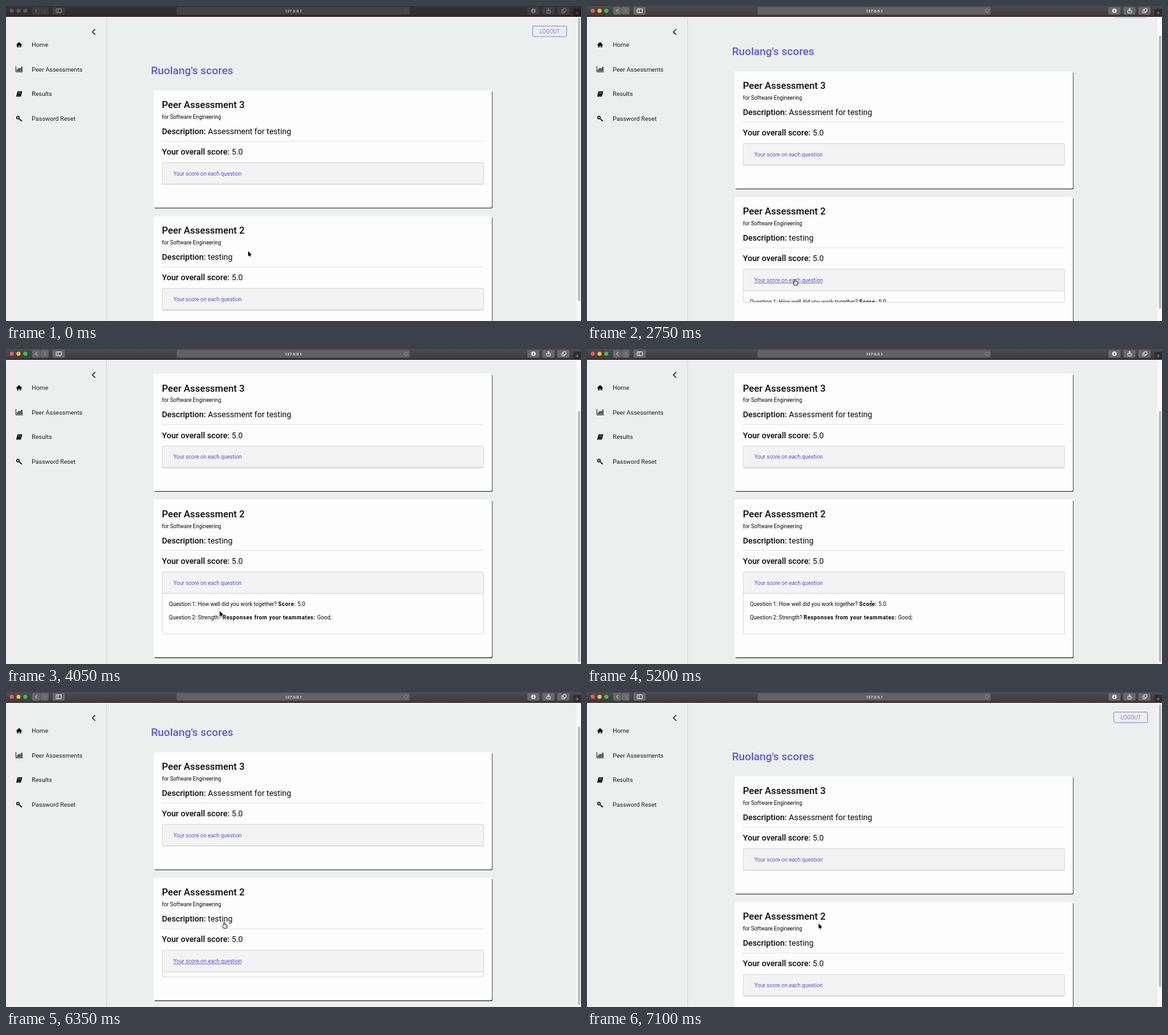
These frames come from a looping animation (900 by 494 pixels, 7150 ms). An HTML page with a canvas:

```html
<!DOCTYPE html>
<html lang="en">
<head>
<meta charset="utf-8">
<title>Scores</title>
<style>
html, body { margin: 0; width: 100%; height: 100%; overflow: hidden; background: #edefef; }
canvas { display: block; width: 900px; height: 494px; }
</style>
</head>
<body>
<canvas id="stage"></canvas>
<script>
const LOOP = 7150, W = 900, H = 494, BAR = 17;
const SIDE = 157, TRACK = 893;              // sidebar edge, scrollbar edge
const BODY = 63.5, SLACK = 30;              // panel height, scroll room when closed
const ROW = 38.6, CARD_GAP = 197.3;
const FONT = 'Roboto, "Open Sans", sans-serif';
const PAGE = '#edefef', INK = '#080808', PURPLE = '#6256e0', LINK = '#5c4fdc';

const canvas = document.getElementById('stage');
const ctx = canvas.getContext('2d');
const dpr = window.devicePixelRatio || 1;
canvas.width = W * dpr;
canvas.height = H * dpr;

const span = (t, a, b) => Math.max(0, Math.min(1, (t - a) / (b - a)));
const smooth = p => p * p * (3 - 2 * p);
const easeOut = p => 1 - (1 - p) ** 3;
const within = (t, a, b) => t >= a && t < b;

// cubic-bezier(.25, .1, .25, 1), solved for x by bisection
function ease(x) {
  const bezier = (u, a, b) => 3 * a * u * (1 - u) ** 2 + 3 * b * u * u * (1 - u) + u ** 3;
  let lo = 0, hi = 1;
  while (hi - lo > 1e-5) {
    const mid = (lo + hi) / 2;
    if (bezier(mid, 0.25, 0.25) < x) lo = mid; else hi = mid;
  }
  return bezier(lo, 0.1, 1);
}

// Pointer moves: begin, end, and where the hot spot comes to rest
const MOVES = [
  [350, 1150, 330, 405],
  [1150, 1380, 325.5, 428.5],
  [3250, 4050, 334.5, 411],
  [4200, 4900, 445, 399],
  [5300, 5900, 341.5, 361],
  [6500, 7000, 362.5, 363]
];

function pointer(t) {
  let x = 379, y = 384.5;
  for (const [a, b, toX, toY] of MOVES) {
    const p = smooth(span(t, a, b));
    x += (toX - x) * p;
    y += (toY - y) * p;
  }
  return [x, y];
}

function text(str, x, y, size, { weight = 400, color = INK, spacing = 0, align = 'left' } = {}) {
  ctx.font = `${weight} ${size}px ${FONT}`;
  ctx.letterSpacing = spacing + 'px';
  ctx.textAlign = align;
  ctx.fillStyle = color;
  ctx.fillText(str, x, y);
  return ctx.measureText(str).width;
}

function rect(x, y, w, h, color) {
  ctx.fillStyle = color;
  ctx.fillRect(x, y, w, h);
}

function round(x, y, w, h, r, fill, stroke) {
  ctx.beginPath();
  ctx.roundRect(x, y, w, h, r);
  if (fill) { ctx.fillStyle = fill; ctx.fill(); }
  if (stroke) { ctx.lineWidth = 1; ctx.strokeStyle = stroke; ctx.stroke(); }
}

function line(pts, color, width = 1) {
  ctx.beginPath();
  pts.forEach(([x, y]) => ctx.lineTo(x, y));
  ctx.strokeStyle = color;
  ctx.lineWidth = width;
  ctx.stroke();
}

function shape(pts, color) {
  ctx.beginPath();
  pts.forEach(([x, y]) => ctx.lineTo(x, y));
  ctx.fillStyle = color;
  ctx.fill();
}

function ring(x, y, r, color, width, sweep = 2 * Math.PI) {
  ctx.beginPath();
  ctx.arc(x, y, r, 0, sweep);
  ctx.strokeStyle = color;
  ctx.lineWidth = width;
  ctx.stroke();
}

function dot(x, y, r, color) {
  ctx.beginPath();
  ctx.arc(x, y, r, 0, 2 * Math.PI);
  ctx.fillStyle = color;
  ctx.fill();
}

// An open "v" with its tip at x, y; dx, dy point towards the tip
function chevron(x, y, dx, dy, color, width) {
  const x0 = x - dx, y0 = y - dy;
  line([[x0 - dy, y0 - dx], [x, y], [x0 + dy, y0 + dx]], color, width);
}

function at(x, y, paint) {
  ctx.save();
  ctx.translate(x, y);
  paint();
  ctx.restore();
}

function clipped(x, y, w, h, paint) {
  ctx.save();
  ctx.beginPath();
  ctx.rect(x, y, w, h);
  ctx.clip();
  paint();
  ctx.restore();
}

function toolbar(active) {
  const fade = ctx.createLinearGradient(0, 0, 0, BAR);
  fade.addColorStop(0, active ? '#4d4b50' : '#333235');
  fade.addColorStop(1, active ? '#3b393d' : '#2b2a2d');
  rect(0, 0, W, BAR, fade);
  rect(0, BAR - 1, W, 1, '#241f25');
  rect(0, BAR, W, 1, '#f6edf3');

  const key = active ? '#69686b' : '#3e3d40';
  const icon = active ? '#e6e6e6' : '#858587';
  const dim = active ? '#98989a' : '#59595b';
  const lights = active ? ['#f9574f', '#f8bc30', '#2fc840'] : Array(3).fill('#59585b');
  lights.forEach((c, i) => dot(9 + i * 10.6, 7.5, 3.2, c));

  for (const x of [41, 54]) round(x, 1.5, 12.5, 12, 2, key);
  for (const x of [73, 816, 839.5, 863]) round(x, 1.5, 19, 12, 2, key);
  chevron(46, 7.5, -2.5, 0, icon);
  chevron(62, 7.5, 2.5, 0, dim);
  round(78.5, 4.5, 8, 6, 0.5, null, icon);
  rect(81, 4.5, 1, 6, icon);

  round(267, 1.5, 365, 12, 2.5, active ? '#626165' : '#434245');
  text('127.0.0.1', 450, 9.8, 6.2, { weight: 500, color: active ? '#fff' : '#d5d5d6', align: 'center' });
  ring(626, 7.5, 2.6, dim, 0.8, 5.4);
  chevron(628.7, 7, 0, 1.5, dim, 0.7);

  dot(825.5, 7.5, 3.6, icon);
  rect(825, 5.3, 1, 4, key);
  chevron(825.5, 9.4, 0, 1.6, key, 0.8);
  round(846.5, 6.5, 5.5, 4.5, 0.3, null, icon);
  rect(848.8, 3.5, 0.9, 5.5, icon);
  chevron(849.2, 3.3, 0, -1.6, icon, 0.8);
  for (const d of [0, 2]) round(870 + d, 6.2 - d, 4.5, 4.5, 0.5, key, icon);

  rect(888, 4.5, 12, 12.5, active ? '#2d2c2f' : '#1e1d20');
  rect(891.5, 10.6, 5, 0.8, dim);
  rect(893.6, 8.5, 0.8, 5, dim);
}

function house() {
  shape([[-5, 0.6], [0, -4.2], [5, 0.6]], INK);
  rect(-3.3, 0, 6.6, 4, INK);
  rect(-0.9, 1.6, 1.8, 2.4, PAGE);
}

function chart() {
  line([[-5, -5], [-5, 4], [6, 4]], INK, 0.9);
  for (let i = 0; i < 4; i++) {
    const h = 3 + i + (i % 2);
    rect(-3.4 + i * 2.3, 3 - h, 1.5, h, INK);
  }
}

function book() {
  ctx.transform(1, 0, -0.27, 1, 0, 0);
  round(-3.5, -4.2, 7.4, 8.5, 0.8, INK);
  for (const y of [-2.4, -0.9, 2.8]) rect(-2, y, 4.6, 0.6, PAGE);
}

function keyIcon() {
  ring(-1.8, -1.5, 2, INK, 1.5);
  line([[-0.4, -0.1], [4.4, 4.2]], INK, 1.4);
  line([[2, 3.4], [3.2, 2]], INK, 1.2);
}

function sidebar() {
  rect(0, BAR + 1, SIDE, H, PAGE);
  rect(SIDE, BAR + 1, 1, H, '#d6d8d8');
  chevron(135.2, 40.7, -4.4, 0, '#222', 1.4);
  const items = { 'Home': house, 'Peer Assessments': chart, 'Results': book, 'Password Reset': keyIcon };
  Object.entries(items).forEach(([label, icon], i) => {
    const y = 60.7 + i * ROW;
    at(20.5, y, icon);
    text(label, 40.3, y + 3.4, 9.55, { color: '#1c1c1c' });
  });
}

function question(y, label, bold, answer) {
  let x = 255 + text(label + ' ', 255, y, 8.6);
  x += text(bold + ' ', x, y, 8.6, { weight: 700, spacing: 0.5 });
  text(answer, x, y, 8.6);
}

// Bold label and value on one line
function field(y, label, value) {
  const w = text(label + ' ', 13, y, 12.8, { weight: 500 });
  text(value, 13 + w, y, 12.6);
}

function card(title, about, open, hover) {
  const h = 184 + open, top = 113.5, head = 33.7, foot = top + head;
  round(1.2, 1.3, 529.4, h, 2, '#4b4b4b');
  round(0, 0, 529.6, h, 2, '#fdfdfd');
  text(title, 13, 27.8, 14.9, { weight: 500 });
  text('for Software Engineering', 13, 44.6, 8.45);
  field(68.5, 'Description:', about);
  rect(13, 79.2, 503, 1, '#e3e3e3');
  field(100.8, 'Your overall score:', '5.0');

  round(13.5, top, 503, head + open, 1.5, '#fdfdfd', '#dcdcdc');
  round(13.5, top, 503, head, 1.5, '#f3f3f3', '#dcdcdc');
  rect(14, foot - 0.5, 502, 1, open ? '#dadada' : '#c9c9c9');
  const w = text('Your score on each question', 31, 133.4, 8.48, { color: LINK });
  if (hover) rect(31, 134.6, w, 0.8, LINK);

  clipped(14, foot, 502, Math.max(0, open - 0.5), () => at(-231, foot, () => {
    question(20, 'Question 1: How well did you work together?', 'Score:', '5.0');
    question(41.1, 'Question 2: Strength?', 'Responses from your teammates:', 'Good;');
  }));
}

function page(scroll, open, hover) {
  clipped(SIDE + 1, BAR, TRACK - SIDE - 1, H - BAR, () => at(0, -scroll, () => {
    round(824.5, 31.5, 53, 16.5, 1.5, null, '#8f87de');
    text('LOGOUT', 835, 43, 8.4, { color: '#857cdb' });
    text("Ruolang's scores", 227, 107, 17, { weight: 500, color: PURPLE });
    at(231, 132.3, () => card('Peer Assessment 3', 'Assessment for testing', 0, false));
    at(231, 132.3 + CARD_GAP, () => card('Peer Assessment 2', 'testing', open, hover));
  }));
}

function scrollbar(scroll, open) {
  const view = H - BAR, ratio = view / (view + SLACK + open);
  rect(TRACK, BAR, W - TRACK, view, '#f9f9f9');
  round(TRACK + 2, BAR + 2 + scroll * ratio, 4, view * ratio - 5, 2, '#bfbfc0');
}

function arrow() {
  const tail = [[1.5, 3], [3.6, 8.6]], head = [[0, 0], [0, 7.8], [5.5, 5.6], [0, 0]];
  line(head, '#fff', 1.2);
  line(tail, '#fff', 2.4);
  shape(head, '#000');
  line(tail, '#000', 1.4);
}

function hand() {
  round(-0.8, 0, 1.7, 6, 0.8, '#fff', '#111');
  round(-2, 3.5, 6.6, 6, 2, '#fff', '#111');
  rect(-0.3, 1, 0.8, 5, '#fff');
  for (const x of [1, 2.6]) rect(x, 5.8, 0.5, 2, '#444');
}

function beam() {
  rect(-0.45, -4, 0.9, 8, '#222');
  for (const s of [-1, 1]) chevron(0, s * 3.6, 0, -s, '#222', 0.8);
}

function draw(t) {
  const open = BODY * (ease(span(t, 2683, 3033)) - ease(span(t, 6147, 6497)));
  const down = SLACK * easeOut(span(t, 150, 700)) + BODY * smooth(span(t, 3250, 3700));
  const back = 1 - smooth(span(t, 6790, 7080));
  const scroll = Math.min(down, SLACK + open) * back;
  const hover = within(t, 1350, 3400) || within(t, 5800, 6700);
  const reading = within(t, 4700, 5500);

  ctx.setTransform(dpr, 0, 0, dpr, 0, 0);
  rect(0, 0, W, H, PAGE);
  page(scroll, open, hover);
  sidebar();
  scrollbar(scroll, open);
  toolbar(t >= 1850);
  at(...pointer(t), hover ? hand : reading ? beam : arrow);
}

const start = performance.now();
function tick() {
  draw((performance.now() - start) % LOOP);
  requestAnimationFrame(tick);
}
tick();
</script>
</body>
</html>
```
